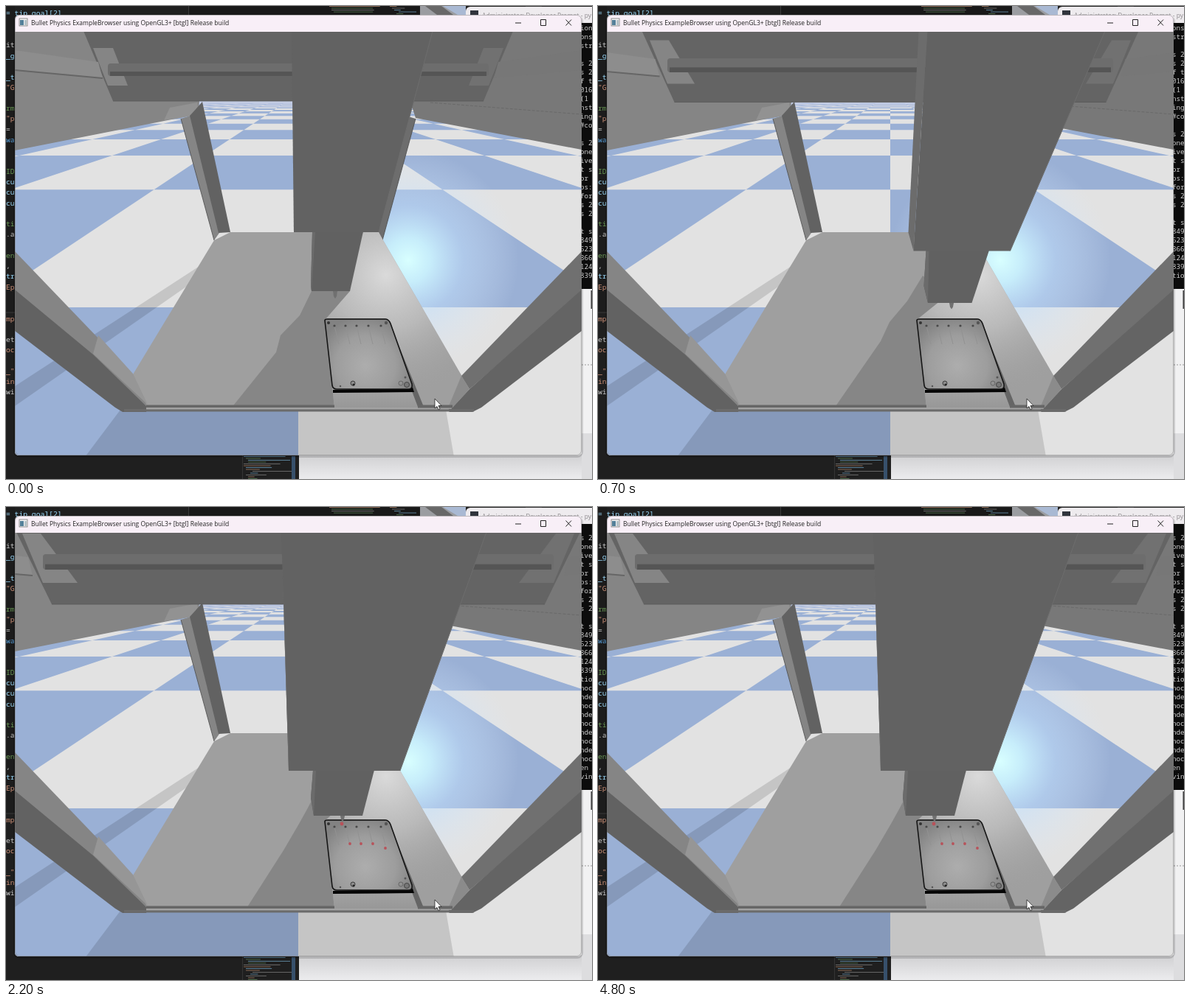
An HTML page for the animation above (4.9 s loop, 794 px wide and 642 px high).

```html
<!DOCTYPE html>
<html lang="en">
<head>
<meta charset="utf-8">
<title>Robot simulation</title>
<style>
html, body { margin: 0; width: 100%; height: 100%; overflow: hidden; background: #1f1f1f; }
svg { display: block; width: 794px; height: 642px; }
.mono { font: 9.2px "Noto Sans Mono", "DejaVu Sans Mono", monospace; white-space: pre; }
.ui { font: 8.5px "Open Sans", "Noto Sans", sans-serif; }
</style>
</head>
<body>
<svg id="stage" viewBox="0 0 794 642" xmlns="http://www.w3.org/2000/svg">
  <defs>
    <clipPath id="view"><path d="M12 34H780V604Q780 610 774 610H18Q12 610 12 604Z"/></clipPath>
    <clipPath id="console"><rect x="776" y="23" width="18" height="361"/></clipPath>
    <radialGradient id="glow" gradientUnits="userSpaceOnUse" cx="545" cy="345" r="150">
      <stop offset="0" stop-color="#d8ffff"/>
      <stop offset=".2" stop-color="#ccf4ff" stop-opacity=".9"/>
      <stop offset=".5" stop-color="#c4e2ff" stop-opacity=".5"/>
      <stop offset="1" stop-color="#dcecff" stop-opacity="0"/>
    </radialGradient>
    <radialGradient id="shine" gradientUnits="userSpaceOnUse" cx="515" cy="365" r="165">
      <stop offset="0" stop-color="#dadada"/>
      <stop offset=".45" stop-color="#bebebe" stop-opacity=".85"/>
      <stop offset="1" stop-color="#a2a2a2" stop-opacity="0"/>
    </radialGradient>
    <radialGradient id="dish" gradientUnits="userSpaceOnUse" cx="487" cy="488" r="68">
      <stop offset="0" stop-color="#adadad"/>
      <stop offset=".6" stop-color="#9d9d9d"/>
      <stop offset="1" stop-color="#828282"/>
    </radialGradient>
    <linearGradient id="floorHole" x1="0" x2="0" y1="0" y2="1">
      <stop offset="0" stop-color="#a0a0a0"/>
      <stop offset=".75" stop-color="#a6a6a6"/>
      <stop offset="1" stop-color="#979797"/>
    </linearGradient>
    <linearGradient id="paper" x1="0" x2="0" y1="0" y2="1">
      <stop offset="0" stop-color="#cfcfd1"/>
      <stop offset="1" stop-color="#ececee"/>
    </linearGradient>
  </defs>
  <g id="desktop"></g>
  <g id="consoleText" class="mono" fill="#cfcfcf" clip-path="url(#console)"></g>
  <g id="scene" clip-path="url(#view)"></g>
  <g id="chrome"></g>
</svg>
<script>
const LOOP = 4900, STEP = 100, CENTER = 396;
const $ = id => document.getElementById(id);
const poly = (points, fill, extra = "") => `<polygon points="${points}" fill="${fill}" ${extra}/>`;
const rect = (x, y, w, h, fill, extra = "") =>
  `<rect x="${x}" y="${y}" width="${w}" height="${h}" fill="${fill}" ${extra}/>`;
const line = (d, stroke, width = 1, extra = "") =>
  `<path d="${d}" fill="none" stroke="${stroke}" stroke-width="${width}" ${extra}/>`;
const mirror = points => points.map((v, i) => i % 2 ? v : 2 * CENTER - v);
const mix = (a, b, k) => a.map((v, i) => v + (b[i] - v) * k);

function random(seed) {
  return () => (seed = seed * 16807 % 2147483647) / 2147483647;
}

// Rows of short coloured dashes, like code seen from far away.
function miniature(x, y, w, h, seed) {
  const next = random(seed), inks = ["#5a7f96", "#8a6a55", "#4f6b4a", "#666"];
  let out = "";
  for (let row = y; row < y + h; row += 2.5) {
    const start = x + Math.floor(next() * 5) * 3;
    out += rect(start, row, 8 + next() * (w - 24), 1, inks[Math.floor(next() * 4)]);
  }
  return out;
}

function drawDesktop() {
  const string = "#ce9178", name = "#9cdcfe", plain = "#c8c8c8", note = "#6a9955", key = "#569cd6";
  const code = [
    [52, "it", plain], [67, "_g", name], [96, "_t", name], [110, '"G', string], [138, "rm", note],
    [152, '"p', string], [167, "= ", plain], [181, "wa", key], [224, "ID", note], [238, "cu", name],
    [252, "cu", name], [267, "cu", name], [295, "ti", note], [309, ".a", plain], [338, "en", note],
    [352, ", ", plain], [366, "tr", name], [381, "Ep", string], [424, "mp", string], [452, "et", plain],
    [466, "oc", string], [495, '_"', string], [509, "in", string], [523, "wi", plain]
  ];
  $("desktop").innerHTML =
    rect(0, 0, 794, 642, "#1f1f1f") + rect(0, 0, 12, 416, "#1c1c1c") +
    line("M0 416H12M247.500 0V12", "#3a3a3a") + rect(248, 0, 313, 12, "#191919") +
    miniature(438, 0, 90, 9, 7) + miniature(520, 0, 42, 12, 31) +
    rect(561, 0, 62, 12, "#9b9da1") + poly("568,0 590,0 606,12 584,12", "#686868") +
    poly("592,0 623,0 623,12 612,12", "#a9b9d3") +
    rect(397, 384, 397, 258, "#f1f1f2") + rect(397, 608, 397, 34, "url(#paper)") +
    rect(780, 580, 14, 62, "#dddddf") + rect(792.500, 386, 2, 25, "#3a3a3a") +
    line("M780 487H794", "#999", 1, 'stroke-dasharray="2 2"') +
    rect(623, 1, 180, 30, "#eeebee", 'rx="6"') + rect(704, 0, 22, 1, "#333") +
    rect(629, 6, 11, 8, "#30343c") +
    `<text class="ui" x="645" y="16" fill="#8d8a8d">Administrator: Developer Prompt - py</text>` +
    rect(776, 23, 18, 361, "#0c0c0c") + miniature(322, 611, 74, 31, 53) +
    line("M320.500 610V642", "#343434") + rect(387, 611, 5, 31, "#37506b") +
    `<g class="mono" style="font-size:9.700px"><text x="0" y="13" fill="${name}">= tip_goal[2]</text>` +
    code.map(([y, s, ink]) => `<text x="0" y="${y + 4}" fill="${ink}">${s.replace('"', "&quot;")}</text>`).join("") +
    "</g>" + rect(10, 13, 772, 600, "#000", 'rx="8" opacity=".15"');
}

function blueTiles() {
  const rowY = n => n < 0 ? 640 : 119 + 236.7 / (n + .816);
  const colX = (c, y) => (CENTER + c * 1.5 * (y - 119)).toFixed(1);
  let d = "";
  for (let n = 0; n < 18; n++) {
    const far = rowY(n), near = rowY(n - 1);
    for (let c = -28; c < 28; c++) {
      if ((n + c) % 2 === 0) continue;
      d += `M${colX(c, far)} ${far}L${colX(c + 1, far)} ${far}L${colX(c + 1, near)} ${near}L${colX(c, near)} ${near}Z`;
    }
  }
  return `<path d="${d}" fill="#9ab0d5"/>`;
}

function dish() {
  const wells = [445, 460, 475, 491, 508];
  return '<g id="plate">' +
    poly("443,521 551,518 553,524 443,525", "#050505") +
    `<path d="M432 427Q432 425 435 425H515Q519 426 521 431L550 513Q551 520 546 520H448Q443 520 442 515Z"
      fill="url(#dish)" stroke="#151515" stroke-width="1.6"/>` +
    wells.map(x => line(`M${x} 434L${x + 6} 459`, "#929292", 1) +
      `<circle cx="${x}" cy="434" r="1.6" fill="#484848"/>`).join("") +
    '<circle cx="437" cy="430" r="2" fill="#333"/><circle cx="515" cy="430" r="2.200" fill="#555"/>' +
    '<circle cx="470" cy="512" r="3" fill="#8c8c8c" stroke="#3b3b3b"/><circle cx="471" cy="514" r="1.500" fill="#222"/>' +
    '<circle cx="535" cy="512" r="3" fill="none" stroke="#666"/><circle cx="543" cy="514" r="3.500" fill="#777" stroke="#444"/>' +
    '<circle cx="541" cy="504" r="1.500" fill="#555"/><circle cx="453" cy="516" r="1.200" fill="#555"/></g>';
}

function drawScene() {
  const post = [237, 153, 250, 149, 289, 308, 282, 318], postDark = [249, 149, 266, 130, 304, 307, 288, 308];
  $("scene").innerHTML =
    rect(12, 34, 768, 580, "#e2e2e2") + rect(12, 34, 768, 100, "#c8d0e6") + blueTiles() +
    rect(12, 128, 768, 10, "#c0cae4", 'opacity=".5"') +
    rect(380, 180, 400, 350, "url(#glow)") +
    poly("262,353 250,377 12,543 12,516", "#000", 'opacity=".13"') +
    poly("155,548 596,548 607,612 107,612", "#000", 'opacity=".13"') +
    // side panels
    poly("12,34 250,34 262,130 260,147 12,196", "#858585") +
    poly("222,138 259,131 262,147 235,152 214,155", "#929292") +
    poly("780,34 540,34 548,130 555,152 780,195", "#787878") +
    line("M575 131L780 147", "#696969", 1, 'stroke-dasharray="4 2"') +
    poly(post, "#858585") + poly(postDark, "#626262") +
    poly(mirror(post), "#6d6d6d") + poly(mirror(postDark), "#626262") +
    line("M237 153L282 318", "#4a4a4a", .8) + line("M555 153L510 318", "#4a4a4a", .8) +
    // bed
    poly("282,318 304,307 488,307 505,307 511,318 628,520 605,547 190,547 172,500", "#9f9f9f") +
    poly("484,307 505,307 511,318 628,520 605,545 445,545 433,425", "url(#shine)") +
    poly("", "#868686", 'id="shadow"') +
    // recess in the bed
    poly("433,425 516,425 522,433 566,546 445,546", "url(#floorHole)") +
    '<g id="recessShade">' + poly("433,428 447,429 437,458 495,459 500,490 527,515 533,527 445,520", "#888") +
    poly("445,524 530,518 545,534 445,538", "#afafaf", 'opacity=".6"') + "</g>" +
    poly("433,426 436,424 514,424 520,431 566,544 558,544 515,430 433,430", "#656565") +
    dish() + '<g id="drops"></g>' +
    // front frame
    poly("12,333 172,500 192,545 12,388", "#858585") + poly("125,447 172,499 192,541 118,472", "#969696") +
    poly("12,385 118,473 192,545 190,551 158,551 148,545 12,441", "#626262") +
    poly("780,333 617,502 628,520 780,388", "#707070") +
    poly("780,385 628,520 605,545 600,551 632,551 644,545 780,441", "#646464") +
    poly("617,502 628,520 605,545 600,543", "#8b8b8b") +
    rect(160, 547, 474, 3.500, "#6b6b6b") + rect(190, 545, 410, 2.500, "#a2a2a2") +
    rect(190, 541.500, 255, 3.500, "#666") + rect(558, 541.500, 47, 4, "#666") +
    '<g id="gantry"></g><g id="head"></g>';
}

function drawChrome() {
  $("chrome").innerHTML =
    '<path d="M12 35V19Q12 12 19 12H773Q780 12 780 19V35Z" fill="#f8eff7"/>' +
    rect(12.500, 12.500, 767, 597, "none", 'rx="6" stroke="#777" stroke-opacity=".45"') +
    rect(18, 17, 11, 10, "#f5f5f5", 'stroke="#777" stroke-width=".8"') +
    rect(19, 19, 5, 7, "#54809a") + rect(25, 19, 3, 7, "#b5c2c8") +
    '<text class="ui" x="34" y="26" fill="#222">Bullet Physics ExampleBrowser using OpenGL3+ [btgl] Release build</text>' +
    line("M690 23H698M724.500 18.500H731.500V26.500H724.500ZM758.500 18.500L766 26.500M766 18.500L758.500 26.500", "#222") +
    '<path d="M581 533V546L584 543.500L586 548L588 547L586 542.500H590Z" fill="#fff" stroke="#222" stroke-width=".8"/>';
}

// Machine poses: carriage body, nozzle block, shadow edge.
const HOME = {
  near: [0], body: [387, 387, 578, 505, 307, 390, 390, 300],
  block: [415, 484, 466, 414, 387, 413, 380, 446, 10],
  shade: [466, 387, 414, 387, 398, 420, 372, 447, 366, 470, 305, 546]
};
const RIGHT = {
  near: [1], body: [482, 506, 796, 612, 358, 465, 451, 315],
  block: [474, 576, 547, 480, 419, 470, 380, 512, 7],
  shade: [478, 400, 466, 345, 440, 381, 418, 411, 400, 440, 335, 546]
};
const MIDDLE = {
  near: [.97], body: [415, 418, 700, 561, 356, 413, 410, 315],
  block: [437, 527, 508, 440, 417, 435, 395, 476, 7],
  shade: [460, 400, 437, 380, 415, 407, 395, 433, 375, 470, 325, 546]
};
const LEFT = {
  near: [1], body: [373, 373, 651, 534, 358, 383, 383, 330],
  block: [416, 499, 483, 417, 419, 413, 395, 456, 8],
  shade: [460, 400, 416, 395, 407, 412, 397, 430, 376, 466, 325, 546]
};
const KEYS = [[0, HOME], [600, HOME], [800, RIGHT], [900, RIGHT], [1300, MIDDLE], [1500, LEFT], [LOOP, LEFT]];

function poseAt(t) {
  const i = KEYS.findIndex(([end], n) => n > 0 && t <= end);
  const [t0, from] = KEYS[i - 1], [t1, to] = KEYS[i], k = (t - t0) / (t1 - t0), pose = {};
  for (const part in from) pose[part] = mix(from[part], to[part], k);
  return pose;
}

function drawGantry(near) {
  const v = mix([105, 145, 129, 78, 138], [14, 62, 132, 64, 50], near);
  const [top, bottom, y, rod, end] = v, span = 2 * (CENTER - end), thick = 17 + 4 * near;
  const bracket = mix([118, 57, 145, 57, 165, 108, 138, 108], [22, 36, 47, 36, 97, 103, 50, 103], near);
  const arm = mix([12, 60, 125, 76, 131, 98, 12, 87], [12, 66, 30, 68, 36, 93, 12, 91], near);
  const edge = [top, 34, bottom, y];
  $("gantry").innerHTML =
    poly([...edge, 2 * CENTER - bottom, y, 2 * CENTER - top, 34], "#646464") +
    poly(arm, "#8d8d8d") + poly(mirror(arm), "#777") +
    line(`M${arm[6]} ${arm[7]}L${arm[4]} ${arm[5]}`, "#666", 2) +
    poly(bracket, "#858585") + poly(mirror(bracket), "#717171") +
    rect(end, rod, span, thick, "#6d6d6d", 'rx="4"') +
    rect(end + 3, rod + thick * .65, span - 6, thick * .35, "#555") +
    line(`M${bottom} ${y}H${2 * CENTER - bottom}`, "#575757", .8);
}

function drawHead(body, block) {
  const [topL, topF, topR, botR, botY, botL, sideX, sideY] = body;
  const [a, b, c, d, y, e, ey, tip, len] = block;
  $("head").innerHTML =
    poly([tip - 3, y, tip + 3, y, tip + 2, y + len - 3, tip, y + len, tip - 2, y + len - 3], "#707070") +
    poly([a, botY - 1, b, botY - 1, c, y, d, y, e, ey], "#616161") +
    poly([e, ey, a, botY, a + 4, botY, d, y], "#6b6b6b") +
    poly([topF, 34, topR, 34, botR, botY, botL, botY], "#626262") +
    poly([topL, 34, topF, 34, botL, botY, sideX, sideY], "#6c6c6c") +
    line(`M${topR} 34L${botR} ${botY}`, "#6d6d6d", 1);
}

const LANDED = [[514, 463], [497, 457], [481, 457], [466, 457]];
function drawDrops(t) {
  const dot = (x, y, r = 1.9) => `<circle cx="${x}" cy="${y}" r="${r}" fill="#b8525a"/>`;
  let out = LANDED.map(([x, y], i) => {
    const age = t - 900 - 200 * i;
    return age < 0 ? "" : age < 100 ? dot(x + 3, y - 8) : dot(x, y);
  }).join("");
  if (t >= 1700) out += dot(455, 430, 2.4);
  $("drops").innerHTML = out;
}

const LOG = ("ion|ons|str||s 2|s 2|f t|016| (1|nst|ing|#co||s 2|one|ive|t s|or |ps:|for|s 2|s 2||t s|849|623|366|124|839|" +
  "tio|noc|nde|noc|nde|noc|nde|noc|nde|noc| en|vin").split("|");
function drawConsole(t) {
  const scroll = t < 900 ? Math.max(0, (t - 600) / 100) : Math.min(12, 3 + (t - 900) / 100);
  $("consoleText").innerHTML = LOG.slice(scroll, scroll + 29)
    .map((s, i) => `<text x="778" y="${33 + 12 * i}">${s}</text>`).join("");
}

function render(t) {
  const pose = poseAt(t), gone = t >= 100 && t < 700;
  $("shadow").setAttribute("points", [...pose.shade, 445, 546, 433, 425]);
  $("plate").style.display = gone ? "none" : "";
  $("recessShade").style.display = gone ? "" : "none";
  drawGantry(pose.near[0]);
  drawHead(pose.body, pose.block);
  drawDrops(t);
  drawConsole(t);
}

drawDesktop();
drawScene();
drawChrome();
const start = performance.now();
let shown = -1;
function tick() {
  const t = Math.floor((performance.now() - start) % LOOP / STEP) * STEP;
  if (t !== shown) render(shown = t);
  requestAnimationFrame(tick);
}
tick();
</script>
</body>
</html>
```
